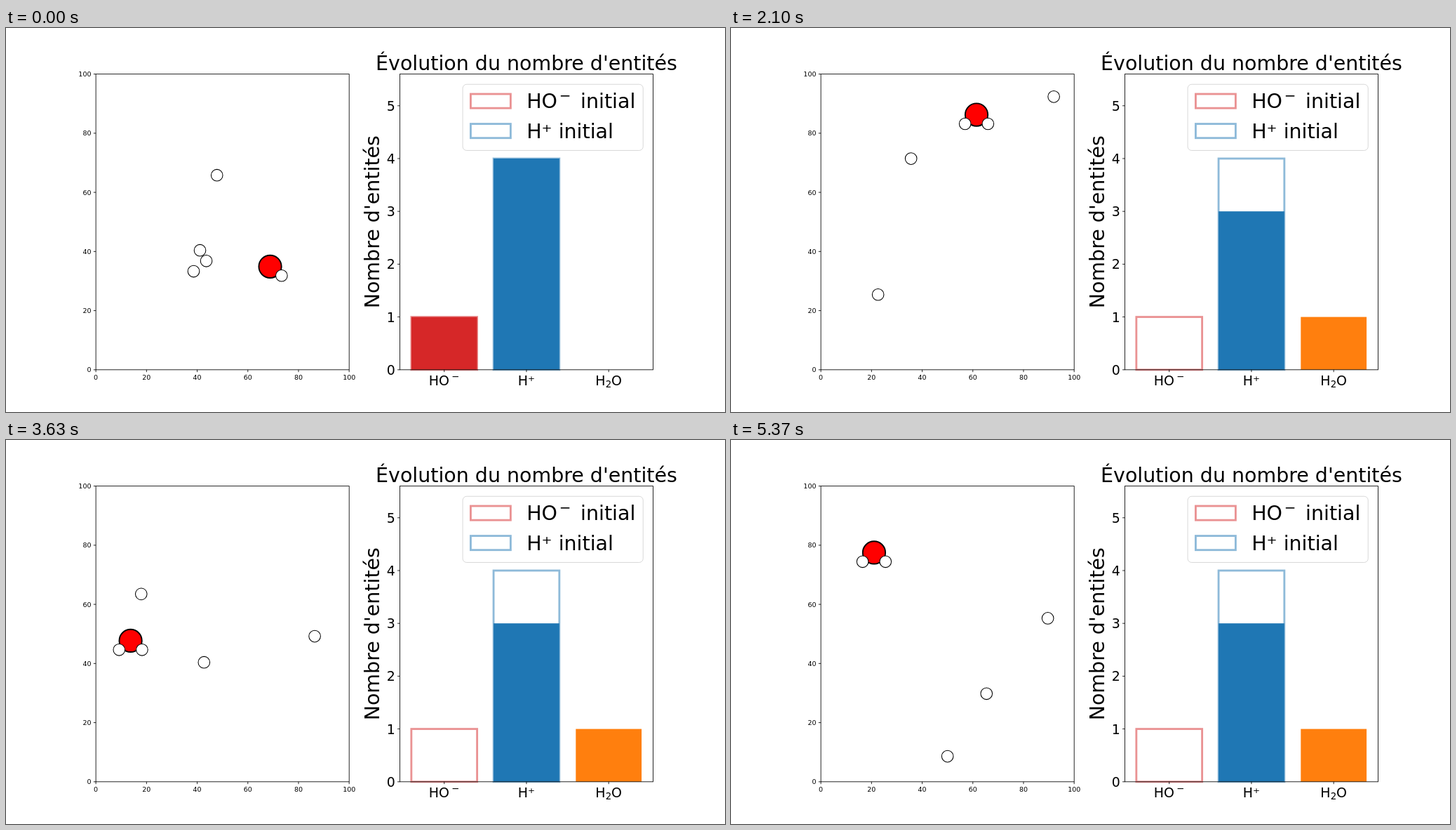
An HTML page that plays this animation: 1025 px wide and 547 px high, repeating every 5.4 s.

```html
<!DOCTYPE html>
<html lang="fr">
<head>
<meta charset="utf-8">
<title>Évolution du nombre d'entités</title>
<style>
  html, body { margin: 0; width: 100%; height: 100%; overflow: hidden; background: #fff; }
  svg { display: block; width: 100vw; height: 100vh; font-family: "DejaVu Sans", sans-serif; }
</style>
</head>
<body>
<svg id="stage" viewBox="0 0 1080 576" preserveAspectRatio="none"></svg>
<script>
const NS = "http://www.w3.org/2000/svg";
const stage = document.getElementById("stage");

function add(tag, attrs, text) {
  const el = document.createElementNS(NS, tag);
  for (const key in attrs) el.setAttribute(key, attrs[key]);
  if (text !== undefined) el.textContent = text;
  stage.appendChild(el);
  return el;
}
const label = (text, x, y, size, anchor = "start", extra = {}) =>
  add("text", { x, y, "font-size": size, "text-anchor": anchor, ...extra }, text);
const box = (x, y, width, height, attrs) => add("rect", { x, y, width, height, ...attrs });
const tick = (x, y, dx, dy) => add("path", { d: `M${x} ${y}l${dx} ${dy}`, stroke: "#000", "stroke-width": 0.9 });

// Plot geometry
const TOP = 69.12, BOTTOM = 512.64, HEIGHT = BOTTOM - TOP, WIDTH = 380.45;
const LEFT = 135, RIGHT = 591.55;
const UNIT = HEIGHT / 5.6;
const BAR = 98.8;
const RED = "#d62728", BLUE = "#1f77b4", ORANGE = "#ff7f0e";
const centers = [0, 1, 2].map(i => RIGHT + (0.54 + i) * WIDTH / 3.08);
const frame = x => box(x, TOP, WIDTH, HEIGHT, { fill: "none", stroke: "#000", "stroke-width": 0.9 });

// Bars: outlines of the initial counts below, current counts above
const outline = color => ({ fill: "none", stroke: color, "stroke-opacity": 0.5, "stroke-width": 3 });
[[RED, 1], [BLUE, 4]].forEach(([color, count], i) =>
  box(centers[i] - BAR / 2, BOTTOM - count * UNIT, BAR, count * UNIT, outline(color)));
const bars = [RED, BLUE, ORANGE].map((fill, i) =>
  box(centers[i] - BAR / 2, BOTTOM, BAR, 0, { fill }));

// Axes
frame(RIGHT);
for (let i = 0; i <= 5; i++) {
  const x = LEFT + i * WIDTH / 5, y = BOTTOM - i * HEIGHT / 5, yCount = BOTTOM - i * UNIT;
  tick(x, BOTTOM, 0, 3.5);
  tick(LEFT, y, -3.5, 0);
  tick(RIGHT, yCount, -3.5, 0);
  label(i * 20, x, 527.6, 10, "middle");
  label(i * 20, LEFT - 7, y + 3.7, 10, "end");
  label(i, RIGHT - 7, yCount + 7.3, 20, "end");
}
centers.forEach(x => tick(x, BOTTOM, 0, 3.5));

label("Évolution du nombre d'entités", RIGHT + WIDTH / 2, 63.1, 30, "middle");
label("Nombre d'entités", 0, 0, 30, "middle", { transform: `translate(560.5 ${(TOP + BOTTOM) / 2}) rotate(-90)` });
label("HO", 635, 536.5, 20);
label("−", 669, 527.7, 14);
label("H⁺", centers[1], 536.5, 20, "middle");
const water = label("", centers[2], 536.5, 20, "middle");
[["H", 20, 0], ["2", 14, 3], ["O", 20, -3]].forEach(([char, size, dy]) => {
  const span = document.createElementNS(NS, "tspan");
  span.setAttribute("font-size", size);
  span.setAttribute("dy", dy);
  span.textContent = char;
  water.appendChild(span);
});

// Legend
box(686, 84.5, 271, 99.2, { rx: 6, fill: "#fff", "fill-opacity": 0.8, stroke: "#ccc", "stroke-opacity": 0.8 });
box(698, 99, 60, 21.2, outline(RED));
box(698, 143.8, 60, 21.2, outline(BLUE));
label("HO", 782, 120, 30);
label("−", 831.2, 108.8, 21);
label("initial", 863, 120, 30);
label("H⁺ initial", 782, 165.3, 30);

// Particles
const ball = (r, fill, width) => add("circle", { r, fill, stroke: "#000", "stroke-width": width });
const oxygen = ball(17, "#f00", 2);
const bonded = [1, -1].map(() => ball(8.75, "#fff", 1.1));
const ions = [1, 2, 3].map(() => ball(8.75, "#fff", 1.1));
frame(LEFT);

// Waypoints [step, x, y]; a value past a wall means the path bounces off that wall first
const oxygenPath = [[0, 68.8, 34.9], [31, 13.7, 47.7], [54, 84.5, 86.6], [86, 152.6, 100.9], [89, 21, 77.5]];
const ionPaths = [
  [[0, 47.8, 65.8], [31, -12.9, 131.5], [54, 44.7, 5], [86, 139.2, 179.7], [89, 50, 8.6]],
  [[0, 41.1, 40.4], [31, 42.7, -35.4], [54, 54.7, 126.5], [80, 2.5, -1.5], [86, 50.3, 22.7], [89, 65.4, 29.8]],
  [[0, 38.6, 33.3], [31, 86.4, -44.2], [54, 4.6, 221], [86, -65.8, 216.2], [89, 89.6, 55.3]]
];
const reacting = [43.6, 36.8];
const STEP_MS = 30, STEPS = 90, REACTION = 12;

function fold(value, margin) {
  const span = 100 - 2 * margin, period = 2 * span;
  const u = ((value - margin) % period + period) % period;
  return margin + (u > span ? period - u : u);
}

function locate(path, step, margin) {
  let i = 1;
  while (i < path.length - 1 && step > path[i][0]) i++;
  const a = path[i - 1], b = path[i], k = (step - a[0]) / (b[0] - a[0]);
  return [1, 2].map(axis => {
    const start = fold(a[axis], margin);
    return fold(start + (b[axis] - start) * k, margin);
  });
}

function place(el, [x, y], dx = 0, dy = 0) {
  el.setAttribute("cx", LEFT + x * WIDTH / 100 + dx);
  el.setAttribute("cy", BOTTOM - y * HEIGHT / 100 + dy);
}

function draw(ms) {
  const step = Math.floor(ms / STEP_MS) % STEPS;
  const reacted = step >= REACTION;
  const center = locate(oxygenPath, step, 10);
  place(oxygen, center);
  place(bonded[0], center, 17.2, 13.6);
  if (reacted) place(bonded[1], center, -17.2, 13.6);
  else place(bonded[1], reacting);
  ions.forEach((ion, i) => place(ion, locate(ionPaths[i], step, 2.5)));
  (reacted ? [0, 3, 1] : [1, 4, 0]).forEach((count, i) => {
    bars[i].setAttribute("y", BOTTOM - count * UNIT);
    bars[i].setAttribute("height", count * UNIT);
  });
}

const begin = performance.now();
function tickFrame() {
  draw(performance.now() - begin);
  requestAnimationFrame(tickFrame);
}
draw(0);
requestAnimationFrame(tickFrame);
</script>
</body>
</html>
```
